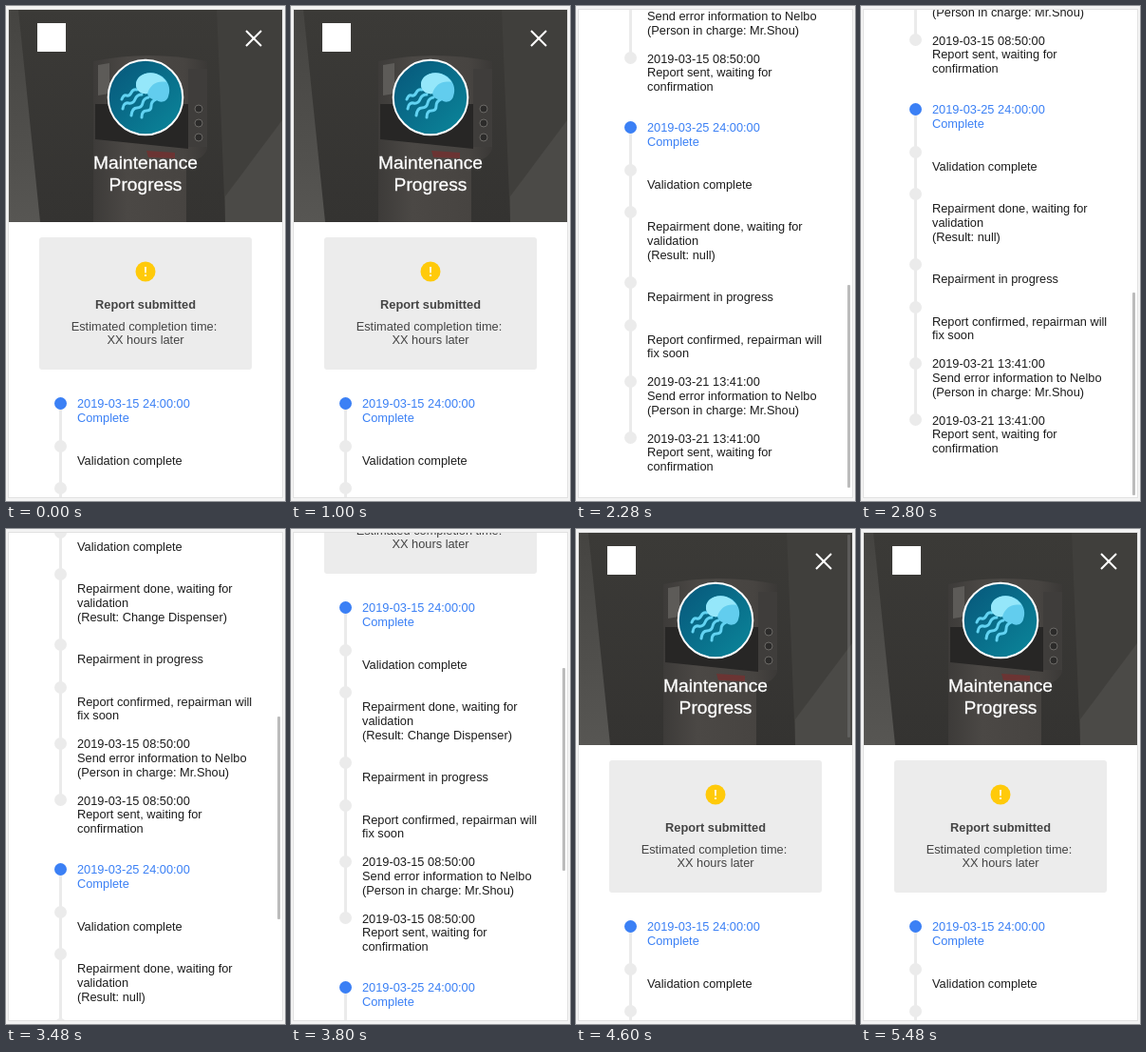
Write an HTML page that moves like this. It is 294x520 px and loops after 5600 ms.

```html
<!DOCTYPE html>
<html lang="en">
<head>
<meta charset="utf-8">
<title>Maintenance progress</title>
<style>
html, body { margin: 0; width: 100%; height: 100%; overflow: hidden; background: #f3f3f3; }
svg { display: block; }
text { font: 12.8px "Liberation Sans", Arial, sans-serif; fill: #1c1c1c; }
.mid { text-anchor: middle; }
.title { font-size: 19.2px; fill: #fff; stroke: #fff; stroke-width: .3; }
.note { fill: #444; }
.head { font-weight: bold; fill: #444; }
.blue { fill: #3b80f5; }
.rail { fill: #ebebeb; }
</style>
</head>
<body>
<svg width="294" height="520" viewBox="0 0 294 520">
  <defs>
    <clipPath id="view"><rect x="3" y="4" width="288" height="512"/></clipPath>
    <clipPath id="photo"><rect x="3" y="4" width="288" height="223"/></clipPath>
    <linearGradient id="back" x2="0" y2="1">
      <stop stop-color="#3b3a37"/><stop offset="1" stop-color="#343331"/>
    </linearGradient>
    <linearGradient id="wall" x2="0" y2="1">
      <stop stop-color="#454441"/><stop offset="1" stop-color="#575653"/>
    </linearGradient>
    <linearGradient id="body">
      <stop stop-color="#3d3b39"/><stop offset=".3" stop-color="#4b4845"/>
      <stop offset=".8" stop-color="#474441"/><stop offset="1" stop-color="#3b3937"/>
    </linearGradient>
    <linearGradient id="sea" x2="1" y2="1">
      <stop stop-color="#07567a"/><stop offset="1" stop-color="#0b879b"/>
    </linearGradient>
  </defs>
  <rect x="2.5" y="3.5" width="289" height="513" fill="#fff" stroke="#e2e2e2"/>
  <g clip-path="url(#view)">
    <g id="page">
      <g clip-path="url(#photo)">
        <path d="M3 4H291V227H3Z" fill="url(#back)"/>
        <path d="M3 4H13L36 227H3Z" fill="url(#wall)"/>
        <path d="M222 4H291V227H231Z" fill="#403f3c"/>
        <path d="M231 200L291 120V227H231Z" fill="#4b4a47"/>
        <path d="M92 58Q150 46 212 58V150Q208 162 190 164V227H92Z" fill="url(#body)"/>
        <path d="M94 103H192V150L94 140Z" fill="#272625"/>
        <path d="M192 66H212V148H192Z" fill="#3f3d3b"/>
        <path d="M97 62L109 60V92L97 94Z" fill="#5d5b58"/>
        <path d="M148 152L178 154V160L150 159Z" fill="#6b3433"/>
        <g fill="#2c2b2a" stroke="#6a6865">
          <circle cx="203" cy="108" r="4"/><circle cx="203" cy="123" r="4"/><circle cx="203" cy="138" r="4"/>
        </g>
      </g>
      <rect x="33" y="18" width="30" height="30" fill="#fff"/>
      <path d="M253 26L269 42M269 26L253 42" stroke="#fff" stroke-width="2"/>
      <circle cx="147" cy="96" r="39.3" fill="url(#sea)" stroke="#fff" stroke-width="2"/>
      <g fill="none" stroke="#62d3f2" stroke-width="3" stroke-linecap="round">
        <path d="M138 88q-4 -1 -6 3t-5 3t-5 4"/>
        <path d="M143 93q-5 0 -7 5t-7 4t-6 6"/>
        <path d="M150 96q-5 1 -6 6t-6 5t-6 8"/>
        <path d="M158 98q-5 2 -5 7t-5 5t-5 7"/>
      </g>
      <path d="M137 84C136 74 147 68 158 71C169 74 175 85 171 95C169 102 161 102 158 98C154 99 150 96 149 92C144 93 138 90 137 84Z" fill="#62cdee"/>
      <path d="M137 84C136 74 147 68 158 71C163 73 167 76 169 80C160 78 152 82 149 92C144 93 138 90 137 84Z" fill="#95e7fa"/>
      <text class="mid title" x="147" y="171">Maintenance</text>
      <text class="mid title" x="147" y="194">Progress</text>

      <rect x="35" y="243" width="224" height="139" rx="3" fill="#ececec"/>
      <circle cx="147" cy="279" r="10.500" fill="#ffca0a"/>
      <path d="M146 274h2l-.3 6.500h-1.400zM146 282h2v2h-2z" fill="#fff"/>
      <text class="mid head" x="147" y="318">Report submitted</text>
      <text class="mid note" x="145.500" y="341">Estimated completion time:</text>
      <text class="mid note" x="147" y="355">XX hours later</text>
    </g>
    <rect id="bar" x="286" width="3" height="213" rx="1" fill="#777" fill-opacity=".5"/>
  </g>
</svg>
<script>
const page = document.getElementById("page"), bar = document.getElementById("bar");
const LINE = 14.67, GAP = 15.25;

function add(tag, attrs, label = "") {
  const el = document.createElementNS("http://www.w3.org/2000/svg", tag);
  for (const k in attrs) el.setAttribute(k, attrs[k]);
  el.textContent = label;
  page.append(el);
  return el;
}

function timeline(top, done, sent, result) {
  const items = [
    [done, "Complete"],
    ["", "Validation complete"],
    ["", "Repairment done, waiting for", "validation", `(Result: ${result})`],
    ["", "Repairment in progress"],
    ["", "Report confirmed, repairman will", "fix soon"],
    [sent, "Send error information to Nelbo", "(Person in charge: Mr.Shou)"],
    [sent, "Report sent, waiting for", "confirmation"]
  ];
  const rail = add("rect", { x: 56, y: top, width: 3, class: "rail" });
  let y = top;
  items.forEach((lines, i) => {
    add("circle", { cx: 57.5, cy: Math.round(y) + .5, r: 6.5, class: i ? "rail" : "blue" });
    lines.forEach((s, n) => {
      if (s) add("text", { x: 75, y: Math.round(y + 5.4 + n * LINE), class: i ? "" : "blue" }, s);
    });
    rail.setAttribute("height", y - top);
    y += lines.length * LINE + GAP;
  });
}

timeline(417, "2019-03-15 24:00:00", "2019-03-15 08:50:00", "Change Dispenser");
timeline(816, "2019-03-25 24:00:00", "2019-03-21 13:41:00", "null");

// [time, value] pairs joined by straight lines
const scrollKeys = [
  [1000, 0], [1200, 25], [1280, 60], [1400, 130], [1480, 205], [1600, 350], [1680, 430],
  [1800, 525], [2000, 628], [2200, 680], [2400, 702], [2680, 708],
  [3200, 708], [3280, 680], [3400, 555], [3480, 459], [3600, 385], [3680, 355], [3800, 335],
  [4000, 335], [4080, 312], [4200, 208], [4280, 142], [4400, 62], [4480, 26], [4600, 0]
];
const fadeKeys = [[1000, 0], [1080, 1], [2800, 1], [3080, 0], [3200, 0], [3280, 1], [4880, 1], [5200, 0]];

function at(keys, t) {
  if (t <= keys[0][0]) return keys[0][1];
  for (let i = 1; i < keys.length; i++) {
    const [t0, a] = keys[i - 1], [t1, b] = keys[i];
    if (t <= t1) return a + (b - a) * (t - t0) / (t1 - t0);
  }
  return keys[keys.length - 1][1];
}

const start = performance.now();
function draw() {
  const now = (performance.now() - start) % 5600;
  // the picture updates in alternating steps of 80 and 120 ms
  const t = Math.floor(now / 200) * 200 + (now % 200 >= 80 ? 80 : 0);
  const scroll = Math.round(at(scrollKeys, t));
  page.setAttribute("transform", `translate(0 ${-scroll})`);
  bar.setAttribute("y", Math.round(6.3 + scroll * .416));
  bar.setAttribute("opacity", at(fadeKeys, t));
  requestAnimationFrame(draw);
}
draw();
</script>
</body>
</html>
```
